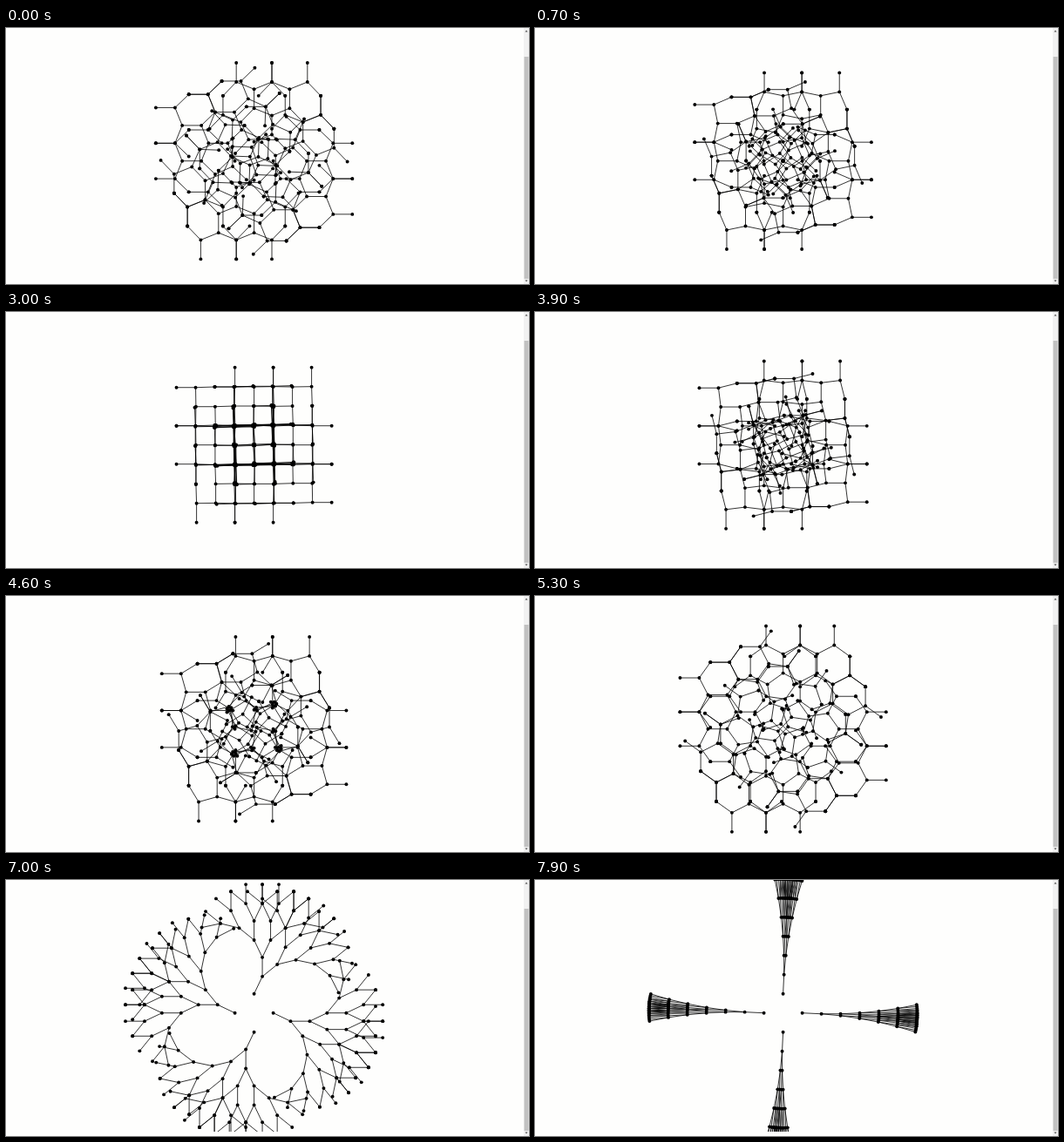
An HTML page with a canvas that plays this animation: 600x294 px, repeating every 8000 ms.

```html
<!DOCTYPE html>
<html lang="en">
<head>
<meta charset="utf-8">
<title>Folding tree</title>
<style>
html, body { margin: 0; width: 100%; height: 100%; overflow: hidden; background: #fefefd; }
canvas { display: block; }
</style>
</head>
<body>
<canvas id="stage"></canvas>
<script>
const W = 600, H = 294, FLOOR = 289;
const CX = 284.6, CY = 152.7, STEP = 22, DEPTH = 6;
const LOOP = 8000, TICK = 100, RAD = Math.PI / 180;

const canvas = document.getElementById('stage');
const ctx = canvas.getContext('2d');
const ratio = window.devicePixelRatio || 1;
canvas.width = W * ratio;
canvas.height = H * ratio;
canvas.style.width = W + 'px';
canvas.style.height = H + 'px';

// The fold angle swings as a cosine, peaking at a right angle.
function foldAt(ms) {
  return Math.PI / 2 * Math.cos((16.35 * ms / 1000 - 40.9) * RAD);
}

function dot(x, y) {
  ctx.beginPath();
  ctx.arc(x, y, 1.95, 0, Math.PI * 2);
  ctx.fill();
}

function segment(x, y, heading, fold, depth) {
  const nx = x + STEP * Math.cos(heading);
  const ny = y + STEP * Math.sin(heading);
  ctx.beginPath();
  ctx.moveTo(x, y);
  ctx.lineTo(nx, ny);
  ctx.stroke();
  dot(nx, ny);
  if (depth > 1) {
    segment(nx, ny, heading + fold, fold, depth - 1);
    segment(nx, ny, heading - fold, fold, depth - 1);
  }
}

function triangle(x, y, dir) {
  ctx.beginPath();
  ctx.moveTo(x - 1.5, y + dir);
  ctx.lineTo(x + 1.5, y + dir);
  ctx.lineTo(x, y - dir);
  ctx.fill();
}

function scrollbar() {
  ctx.fillStyle = '#f1f1f1';
  ctx.fillRect(594, 0, 6, H);
  ctx.fillStyle = '#c1c1c1';
  ctx.fillRect(594.5, 33, 5, 255);
  ctx.fillStyle = '#505050';
  triangle(597, 3.5, 1);
  triangle(597, 290.5, -1);
}

function draw(ms) {
  const fold = foldAt(ms);
  ctx.setTransform(ratio, 0, 0, ratio, 0, 0);
  ctx.fillStyle = '#fefefd';
  ctx.fillRect(0, 0, W, H);

  ctx.save();
  ctx.beginPath();
  ctx.rect(0, 0, W, FLOOR);
  ctx.clip();
  ctx.fillStyle = '#000';
  ctx.strokeStyle = '#000';
  ctx.lineWidth = 0.8;
  for (let i = 0; i < 4; i++) {
    const heading = i * Math.PI / 2;
    const x = CX + STEP * Math.cos(heading);
    const y = CY + STEP * Math.sin(heading);
    dot(x, y);
    segment(x, y, heading + fold, fold, DEPTH);
  }
  ctx.restore();
  scrollbar();
}

const start = performance.now();
function frame() {
  const t = (performance.now() - start) % LOOP;
  draw(Math.floor(t / TICK) * TICK);
  requestAnimationFrame(frame);
}
frame();
</script>
</body>
</html>
```
